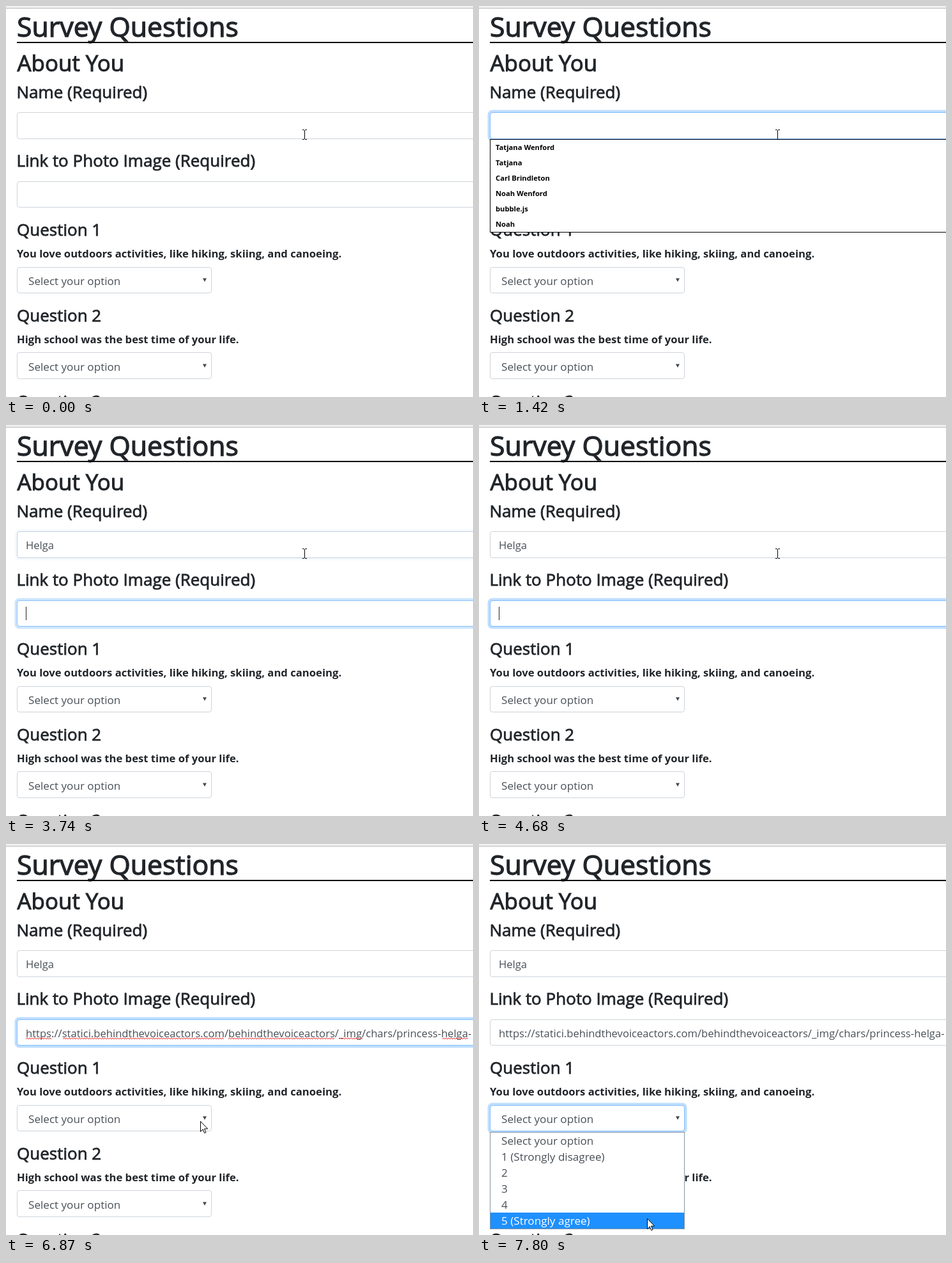
Write an HTML page that moves like this. It is 731 px wide and 611 px high and loops after 8 s.

```html
<!DOCTYPE html>
<html lang="en">
<head>
<meta charset="utf-8">
<title>Survey Questions</title>
<style>
  html, body { margin: 0; width: 100%; height: 100%; overflow: hidden; background: #fff; }
  svg { display: block; width: 731px; height: 611px; font-family: "Open Sans", "Noto Sans", sans-serif; }
  text { white-space: pre; fill: #212529; }
  .h { stroke: #212529; stroke-width: .03em; }
  .h1 { font-size: 42.8px; }
  .h2 { font-size: 34.9px; }
  .h4 { font-size: 26px; }
  .label { font-size: 16.67px; font-weight: 700; }
  .input { font-size: 16.63px; fill: #495057; }
  .option { font-size: 17.1px; fill: #495057; }
  .on { fill: #fff; }
  .hint { font-size: 11.2px; font-weight: 700; fill: #000; }
  .box { fill: #fff; stroke: #ced4da; }
  .glow { fill: none; stroke: #007bff; stroke-opacity: .25; stroke-width: 3.5; }
  .ring { fill: none; stroke: #80bdff; }
  .squiggle { fill: none; stroke: #f03030; stroke-width: 1; }
</style>
</head>
<body>
<svg id="stage" viewBox="0 0 731 611"></svg>
<script>
const LOOP = 8000;
const stage = document.getElementById('stage');

function add(tag, attrs, parent = stage) {
  const el = document.createElementNS('http://www.w3.org/2000/svg', tag);
  for (const key in attrs) el.setAttribute(key, attrs[key]);
  parent.appendChild(el);
  return el;
}

function write(str, x, y, cls, parent) {
  const el = add('text', { x, y, class: cls }, parent);
  el.textContent = str;
  return el;
}

function rect(x, y, width, height, fill, parent) {
  return add('rect', { x, y, width, height, fill }, parent);
}

// Form control with a focus ring that can be faded in
function control(top, bottom, width) {
  const height = bottom - top;
  const edge = { x: 17.5, y: top + .5, width: width - 1, height: height - 1, rx: 3.5 };
  add('rect', { ...edge, class: 'box' });
  const focus = add('g', { opacity: 0 });
  add('rect', { x: 15.25, y: top - 1.75, width: width + 3.5, height: height + 3.5, rx: 5.5, class: 'glow' }, focus);
  add('rect', { ...edge, class: 'ring' }, focus);
  return focus;
}

function question(n, str, y, top, bottom) {
  write('Question ' + n, 17, y, 'h h4');
  write(str, 17, y + 34, 'label');
  const focus = control(top, bottom, 305);
  write('Select your option', 35, y + 77, 'option');
  add('path', { d: `M308 ${y + 66.5}h6l-3 5.5z`, fill: '#40464c' });
  return focus;
}

function squiggle(from, to, parent) {
  let d = `M${from} 305`;
  for (let x = from + 2, up = true; x <= to; x += 2, up = !up) d += `L${x} ${up ? 303 : 305}`;
  add('path', { d, class: 'squiggle' }, parent);
}

// Page
rect(0, 0, 731, 3, '#f1f1f1');
rect(0, 3, 731, 1, '#b9b9b9');
write('Survey Questions', 17, 48, 'h h1');
rect(17, 56, 714, 2, '#000');
write('About You', 17.5, 102, 'h h2');
write('Name (Required)', 16.5, 144, 'h h4');
write('Link to Photo Image (Required)', 16.5, 251, 'h h4');

const nameFocus = control(166, 208, 760);
const nameText = write('', 31, 194, 'input');
const linkFocus = control(274, 315, 760);
const linkText = write('https://statici.behindthevoiceactors.com/behindthevoiceactors/_img/chars/princess-helga-', 31, 302, 'input');
const errors = add('g', {});
[[31, 72], [89, 341], [348, 515], [522, 559], [683, 724]].forEach(([a, b]) => squiggle(a, b, errors));
const caret = rect(31, 177, 1, 21, '#222');

const selectFocus = question(1, 'You love outdoors activities, like hiking, skiing, and canoeing.', 359, 408, 449);
question(2, 'High school was the best time of your life.', 493, 541, 583);
write('Question 3', 17, 627, 'h h4');

// Autocomplete list
const hints = add('g', {});
add('rect', { x: 17.5, y: 208.5, width: 760, height: 145, fill: '#fff', stroke: '#000' }, hints);
['Tatjana Wenford', 'Tatjana', 'Carl Brindleton', 'Noah Wenford', 'bubble.js', 'Noah']
  .forEach((str, i) => write(str, 26, 225 + i * 24, 'hint', hints));

// Opened select
const menu = add('g', {});
add('rect', { x: 17.5, y: 450.5, width: 304, height: 151, fill: '#fff', stroke: '#8394a5' }, menu);
const bar = rect(18, 451, 303, 25, '#1e90ff', menu);
const options = ['Select your option', '1 (Strongly disagree)', '2', '3', '4', '5 (Strongly agree)']
  .map((str, i) => write(str, 35, 470 + i * 25, 'option', menu));

// Pointers
const beam = add('path', {
  d: 'M464 193.5h2.5l1 1l1-1h2.5M467.5 194v14M464 208.5h2.5l1-1l1 1h2.5',
  fill: 'none', stroke: '#000'
});
const arrow = add('path', {
  d: 'M.5 .5v16l3.7-3.6l2.5 5.8l2.3-1l-2.5-5.7h5.2z',
  fill: '#fff', stroke: '#000'
});

// Each row: start time, value
const steps = {
  name: [[0, ''], [1570, 'H'], [2030, 'He'], [2350, 'Hel'], [2500, 'Helg'], [2810, 'Helga']],
  nameFocus: [[0, 0], [170, .6], [320, 1], [3740, .15], [3890, 0]],
  linkFocus: [[0, 0], [3740, .8], [3890, 1], [7190, 0]],
  selectFocus: [[0, 0], [7190, 1]],
  hints: [[0, 0], [320, 1], [1570, 0]],
  caret: [[0, 0], [170, 1], [800, 0], [1110, 1], [1420, 0], [1570, 1], [3420, 0],
    [3740, 1], [4210, 0], [4680, 1], [5000, 0]],
  link: [[0, 0], [5000, 1]],
  errors: [[0, 0], [5000, 1], [7190, 0]],
  menu: [[0, 0], [7190, 1]],
  mouse: [[0, null], [5780, [434, 212]], [5940, [412, 252]], [6100, [383, 306]], [6260, [350, 362]],
    [6420, [322, 408]], [6570, [305, 433]], [6870, [304, 433]],
    [7500, [296, 492]], [7650, [277, 556]], [7800, [263, 585]]]
};

function at(key, t) {
  let value;
  for (const [start, v] of steps[key]) if (t >= start) value = v;
  return value;
}

const show = (el, on) => el.setAttribute('visibility', on ? 'visible' : 'hidden');

function draw(t) {
  const name = at('name', t);
  if (nameText.textContent !== name) nameText.textContent = name;

  nameFocus.setAttribute('opacity', at('nameFocus', t));
  linkFocus.setAttribute('opacity', at('linkFocus', t));
  selectFocus.setAttribute('opacity', at('selectFocus', t));

  show(hints, at('hints', t));
  show(linkText, at('link', t));
  show(errors, at('errors', t));
  show(menu, at('menu', t));
  show(caret, at('caret', t));

  const inLink = t >= 3740;
  const typed = name && !inLink ? Math.round(nameText.getComputedTextLength()) : 0;
  caret.setAttribute('x', 31 + Math.min(typed, 43));
  caret.setAttribute('y', inLink ? 284 : 177);

  const mouse = at('mouse', t);
  show(beam, !mouse);
  show(arrow, mouse);
  if (mouse) {
    arrow.setAttribute('transform', `translate(${mouse})`);
    const row = Math.max(0, Math.min(5, Math.floor((mouse[1] - 451) / 25)));
    bar.setAttribute('y', 451 + row * 25);
    options.forEach((el, i) => el.setAttribute('class', i === row ? 'option on' : 'option'));
  }
}

const begin = performance.now();
function tick() {
  draw((performance.now() - begin) % LOOP);
  requestAnimationFrame(tick);
}
tick();
</script>
</body>
</html>
```
